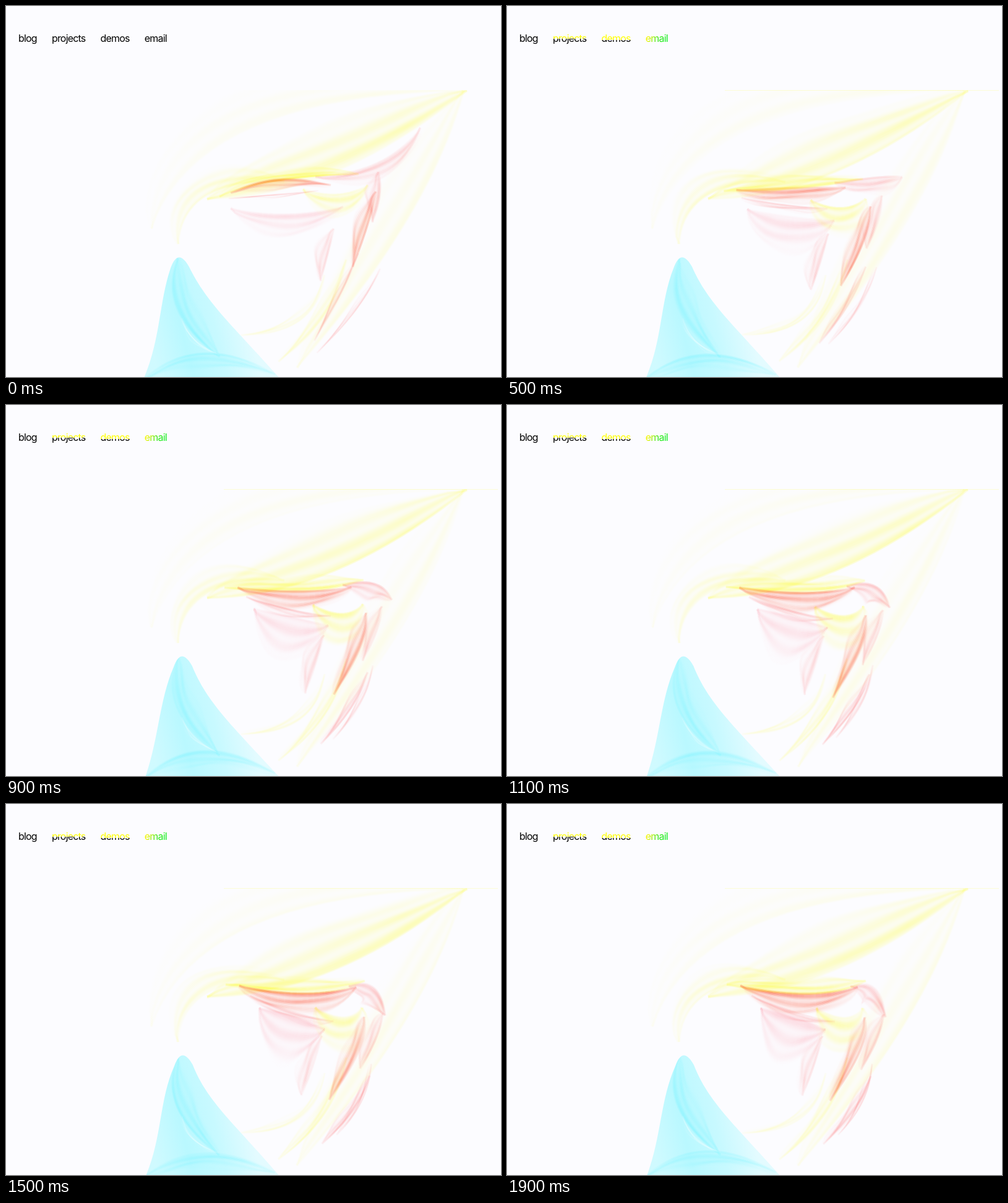
An HTML page with a canvas for the animation above (2 s loop, 800 by 600 pixels).

```html
<!DOCTYPE html>
<html lang="en">
<head>
<meta charset="utf-8">
<title>Veil</title>
<style>
  html, body { margin: 0; width: 100%; height: 100%; overflow: hidden; background: #fcfcff; }
  canvas { position: absolute; left: 0; top: 0; filter: blur(.7px); }
  nav {
    position: absolute; left: 20px; top: 42px; display: flex; gap: 24px;
    font: 400 16px/20px Inter, "Liberation Sans", sans-serif; letter-spacing: -.05em; color: #000;
  }
  .tinted .split, .tinted .green { color: transparent; -webkit-background-clip: text; background-clip: text; }
  .tinted .split { background-image: linear-gradient(#ff0 var(--cut), #000 var(--cut)); }
  .tinted .green { background-image: linear-gradient(115deg, #f0f400 20%, #38e818 55%, #00f020); }
</style>
</head>
<body>
<canvas width="800" height="600"></canvas>
<nav>
  <span>blog</span>
  <span class="split" style="--cut: 54%">projects</span>
  <span class="split" style="--cut: 65%">demos</span>
  <span class="green">email</span>
</nav>
<script>
const ctx = document.querySelector('canvas').getContext('2d');
const nav = document.querySelector('nav');
const STEP = 100, LOOP = 2000, LAST = LOOP / STEP - 1;

const salmon = '255,146,124', rose = '255,176,176', blush = '255,196,204';
const yellow = '255,255,70', cream = '255,255,140', aqua = '176,250,255';

// A sheet hangs from a curve through three points. A positive width lies to
// the right of the direction of travel; sheets with `to` drift towards it.
const sheets = [
  // yellow cloth
  { from: [235,360, 400,195, 745,137], width: [-70], color: cream, alpha: .07 },
  { from: [278,385, 325,305, 450,284], width: [-38], color: cream, alpha: .24 },
  { from: [325,312, 530,268, 745,137], width: [-80], color: cream, alpha: .34 },
  { from: [740,137, 645,350, 470,585], width: [70], color: cream, alpha: .12 },
  { from: [515,435, 475,508, 380,532], width: [14], color: cream, alpha: .2 },
  { from: [550,410, 515,500, 440,575], width: [18], color: cream, alpha: .28 },
  { from: [345,308, 440,282, 570,272], to: [355,292, 490,307, 580,286], width: [-18, -28], color: yellow, alpha: .42 },
  { from: [480,296, 535,305, 585,290], to: [500,330, 545,346, 575,330], width: [38, 60], color: cream, alpha: .45 },
  // pink cloth
  { from: [363,327, 450,337, 545,325], to: [410,330, 465,345, 515,365], width: [38, 85], color: blush, alpha: .3 },
  { from: [530,360, 520,400, 508,445], to: [510,375, 495,425, 477,472], width: [24, 26], color: rose, alpha: .28 },
  { from: [500,276, 600,254, 670,197], to: [555,295, 594,298, 612,345], width: [26, 34], color: rose, alpha: .38 },
  { from: [602,268, 604,305, 592,350], to: [609,340, 598,380, 572,430], width: [26, 24], color: rose, alpha: .34 },
  { from: [598,300, 583,358, 560,422], to: [578,345, 571,398, 522,480], width: [24, 26], color: salmon, alpha: .46 },
  { from: [570,400, 540,468, 498,541], to: [588,440, 562,495, 511,550], width: [10, 14], color: rose, alpha: .45 },
  { from: [605,425, 565,492, 502,561], to: [590,420, 575,480, 535,535], width: [7, 9], color: rose, alpha: .34 },
  { from: [360,311, 435,305, 505,299], to: [395,310, 470,338, 530,352], width: [5, 16], color: rose, alpha: .4 },
  { from: [363,302, 440,280, 525,290], to: [377,294, 480,307, 567,296], width: [17, 36], color: salmon, alpha: .55 }];

const lerp = (a, b, t) => a + (b - a) * t;
const easeOut = s => 1 - (1 - s) ** 2.5;

// Quadratic through three points: position and unit normal at u
function onCurve([x0, y0, x1, y1, x2, y2], u) {
  const axis = (a, m, b) => {
    const c = 2 * m - (a + b) / 2;
    return [(1 - u) ** 2 * a + 2 * u * (1 - u) * c + u * u * b, (1 - u) * (c - a) + u * (b - c)];
  };
  const [x, dx] = axis(x0, x1, x2), [y, dy] = axis(y0, y1, y2), len = Math.hypot(dx, dy) || 1;
  return { x, y, nx: -dy / len, ny: dx / len };
}

function drawSheet({ from, to = from, width: [w0, w1 = w0], color, alpha }, seed, step) {
  const p = easeOut(step / LAST);
  const curve = from.map((v, i) => lerp(v, to[i], p)), width = lerp(w0, w1, p);
  const threads = Math.ceil(Math.abs(width) / 2.2) + 2;
  const fade = ctx.createLinearGradient(curve[0], curve[1], curve[4], curve[5]);
  [.15, .8, 1, .9, .1].forEach((a, i) => fade.addColorStop(i / 4, `rgba(${color},${a})`));
  ctx.strokeStyle = fade;
  ctx.lineWidth = Math.abs(width) / threads * 1.8;
  for (let j = 0; j < threads; j++) {
    const v = j / threads;
    const crease = .65 + .35 * Math.sin(v * 17 + seed * 2.3 - step * .3);
    ctx.globalAlpha = alpha * (1 - v) ** .8 * crease;
    ctx.beginPath();
    for (let u = 0; u <= 1.001; u += .05) {
      const { x, y, nx, ny } = onCurve(curve, u);
      const belly = Math.sin(Math.PI * Math.min(1, Math.max(0, u))) ** .7;
      const d = width * v * belly + 3 * v * Math.sin(u * 9 + v * 5 - step * .6);
      ctx.lineTo(x + nx * d, y + ny * d);
    }
    ctx.stroke();
  }
  ctx.globalAlpha = 1;
}

function drawSail(step) {
  const sway = 3 * Math.sin(step * .5), drift = 6 * easeOut(step / LAST);
  const shade = ctx.createLinearGradient(230, 530, 385, 490);
  ['#d2fdff', '#bcfbff', '#cafcff', '#e6feff'].forEach((c, i) => shade.addColorStop(i / 3, c));
  ctx.save();
  ctx.beginPath();
  ctx.moveTo(222 + drift / 2, 604);
  ctx.bezierCurveTo(250 + sway, 540, 247, 480, 266 + drift, 424);
  ctx.quadraticCurveTo(278 + drift, 390, 296 + drift, 422);
  ctx.bezierCurveTo(325, 482, 370 + sway, 520, 444, 604);
  ctx.fillStyle = shade;
  ctx.fill();
  ctx.clip();
  const folds = [
    { from: [278,408, 277,490, 345,568], width: [-34], color: aqua, alpha: .34 },
    { from: [222,604, 320,562 + sway, 435,596], width: [26], color: aqua, alpha: .34 }];
  folds.forEach((fold, i) => drawSheet(fold, i, step));
  ctx.globalCompositeOperation = 'source-over';
  drawSheet({ from: [284,505, 305,540 + sway, 345,564], width: [4], color: '240,255,255', alpha: .5 }, 1, step);
  ctx.restore();
}

function draw(step) {
  nav.classList.toggle('tinted', step > 0);
  ctx.fillStyle = '#fcfcff';
  ctx.fillRect(0, 0, 800, 600);
  ctx.save();
  ctx.beginPath();
  ctx.rect(0, 136, 800, 464);
  ctx.clip();
  // Multiplying lets pink turn orange where it crosses yellow.
  ctx.globalCompositeOperation = 'multiply';
  drawSail(step);
  sheets.forEach((sheet, i) => drawSheet(sheet, i, step));
  if (step > 0) {
    ctx.fillStyle = 'rgba(255,255,140,.35)';
    ctx.fillRect(352, 136, 443, 1);
  }
  ctx.restore();
}

let shown = -1;
function tick(now) {
  const step = Math.floor(now % LOOP / STEP);
  if (step !== shown) draw(shown = step);
  requestAnimationFrame(tick);
}
draw(shown = 0);
requestAnimationFrame(tick);
</script>
</body>
</html>
```
